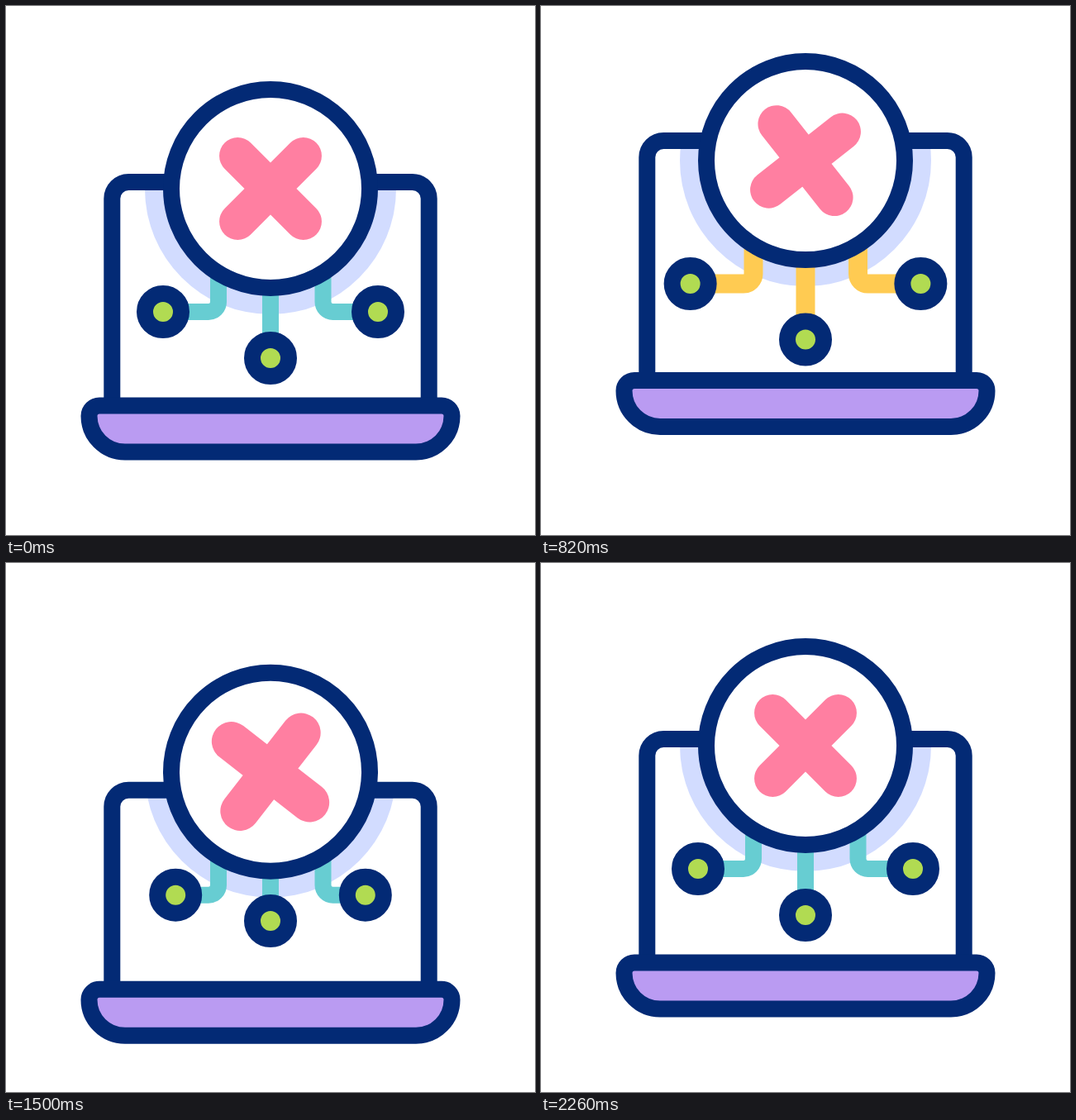
These frames come from a looping animation (640x640 px, 2600 ms). An HTML page:

```html
<!DOCTYPE html>
<html lang="en">
<head>
<meta charset="utf-8">
<title>Laptop error</title>
<style>
  html, body { margin: 0; width: 100%; height: 100%; overflow: hidden; background: #fff; }
  svg { display: block; width: 100%; height: 100%; }
  .ink { stroke: #032a75; stroke-width: 20; }
  .wire { fill: none; stroke: #67cdd2; stroke-width: 20; }
  .wire.hot { stroke: #ffcb52; stroke-width: 23; }
</style>
</head>
<body>
<svg viewBox="0 0 640 640">
  <defs><clipPath id="inside"><rect id="window" x="128" y="213" width="384" height="270"/></clipPath></defs>
  <g clip-path="url(#inside)"><circle id="shade" cx="320" cy="221" r="152" fill="#d2dcff"/></g>
  <path id="wires" class="wire"/>
  <path id="screen" class="ink" fill="none"/>
  <g id="base">
    <path class="ink" fill="#ba9bf2" d="M113 483.5H527A12.5 12.5 0 0 1 539.5 496A43.5 43.5 0 0 1 496 539.5H144A43.5 43.5 0 0 1 100.5 496A12.5 12.5 0 0 1 113 483.5Z"/>
  </g>
  <g class="ink" fill="#b1db52">
    <circle id="left" r="22"/>
    <circle id="right" r="22"/>
    <circle id="middle" r="22"/>
  </g>
  <circle id="badge" class="ink" cx="320" cy="221" r="120" fill="#fff"/>
  <path id="cross" d="M-39.7-39.7L39.7 39.7M39.7-39.7L-39.7 39.7" stroke="#ff7fa1" stroke-width="44.5" stroke-linecap="round"/>
</svg>
<script>
const LOOP = 2600, START = 220, END = 2260, SWING = 456;

// One hop: crouch, leap, land, rebound, settle.
const BEATS = [START, 390, 1200, 1460, 1720, 2000];
const smooth = p => p * p * (3 - 2 * p);
const leap = p => 1 - (1 - p) ** 2.75;

// Each part makes the same hop with its own lag and reach.
function hop(t, lag, crouch, air, land, rebound) {
  const poses = [0, crouch, air, land, rebound, 0];
  const time = t - lag;
  const i = BEATS.findIndex(beat => beat > time) - 1;
  if (i < 0) return 0;
  const p = (time - BEATS[i]) / (BEATS[i + 1] - BEATS[i]);
  return poses[i] + (poses[i + 1] - poses[i]) * (i === 1 ? leap : smooth)(p);
}

// The cross rocks at a steady rate and pulses in step.
function wobble(t) {
  const fade = Math.max(0, Math.min(1, (t - START) / 100, (END - t) / 100));
  const turn = 2 * Math.PI / SWING * (t - START);
  return {
    angle: fade * 6.7 * Math.asin(Math.sin(turn + 0.14)),
    size: 1 + fade * (0.037 - 0.0875 * Math.cos(turn - 0.75))
  };
}

const el = id => document.getElementById(id);
function set(id, attrs) {
  for (const name in attrs) el(id).setAttribute(name, attrs[name]);
}

function draw(t) {
  const lift = hop(t, 0, 36, -40, 36, -19.6);
  const top = 213 + hop(t, 33, 64, -71, 62, -34);
  const cy = 221 + hop(t, 60, 39, -50.5, 33, -24.5);
  const low = 426 + hop(t, 110, 12.4, -34, 15.7, -10.6);
  const reach = 130 - hop(t, 40, 22.6, -15.6, 15.2, -15.7);
  const foot = 483.5 + lift, y = cy + 149;
  const { angle, size } = wobble(t);
  const hot = t >= BEATS[1] && t < BEATS[3];

  set("window", { y: top, height: foot - top });
  set("shade", { cy });
  set("badge", { cy });
  set("screen", { d: `M128.3 ${foot}V${top + 20}a20 20 0 0 1 20-20H491.7a20 20 0 0 1 20 20V${foot}` });
  set("base", { transform: `translate(0 ${lift})` });
  set("left", { cx: 320 - reach, cy: y });
  set("right", { cx: 320 + reach, cy: y });
  set("middle", { cx: 320, cy: low });
  set("wires", {
    class: hot ? "wire hot" : "wire",
    d: `M257 ${cy + 80}V${y - 12}a12 12 0 0 1-12 12H${320 - reach}`
      + `M383.5 ${cy + 80}V${y - 12}a12 12 0 0 0 12 12H${320 + reach}`
      + `M320 ${cy + 100}V${low}`
  });
  set("cross", { transform: `translate(320 ${cy}) rotate(${angle}) scale(${size})` });
}

const start = performance.now();
function tick() {
  draw((performance.now() - start) % LOOP);
  requestAnimationFrame(tick);
}
tick();
</script>
</body>
</html>
```
